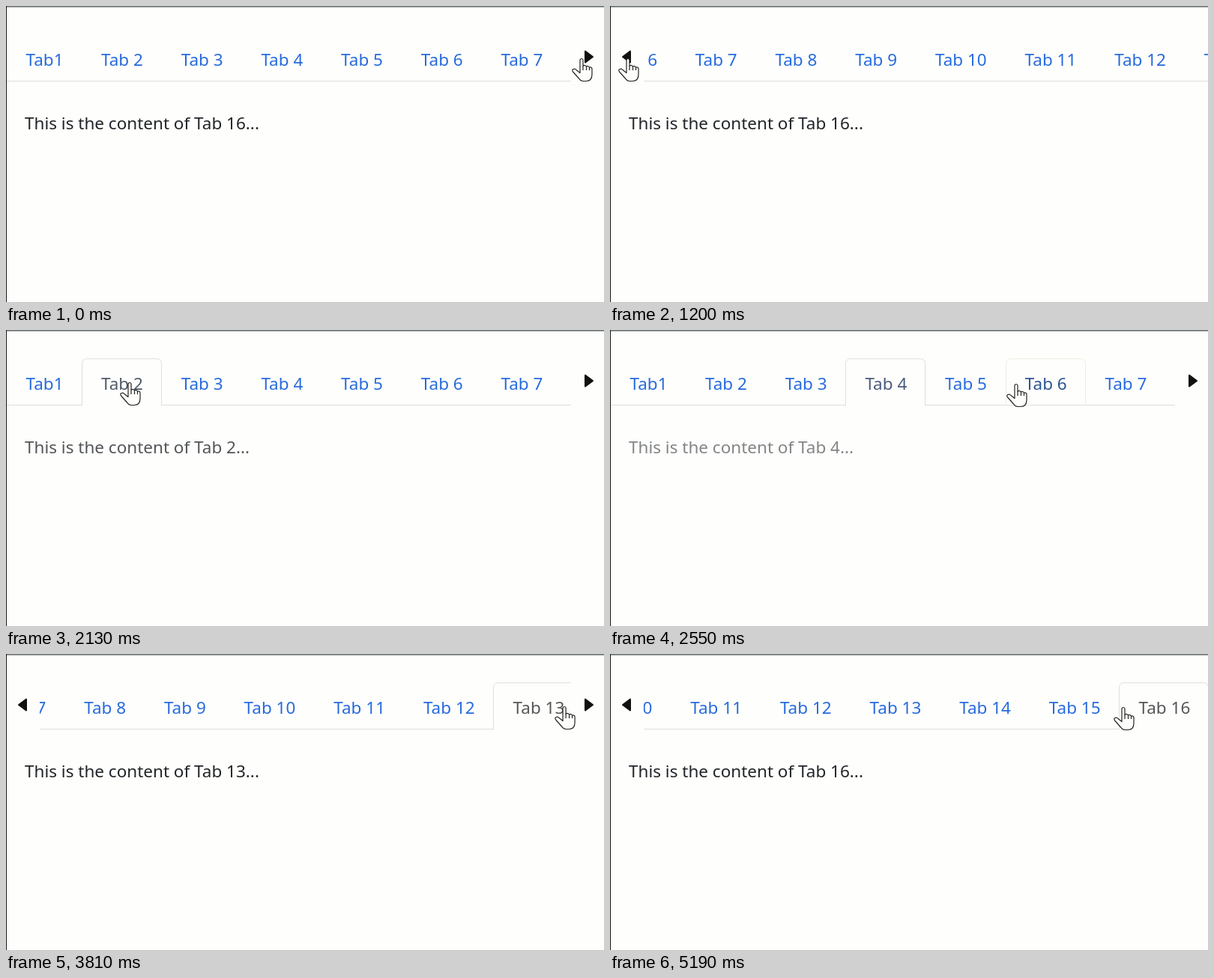
Recreate the animation shown at these times as an HTML page with a canvas. Size 798x396 px, loop 5.22 s.

```html
<!DOCTYPE html>
<html lang="en">
<head>
<meta charset="utf-8">
<title>Scrolling tabs</title>
<style>
html, body { margin: 0; width: 100%; height: 100%; overflow: hidden; background: #fefefc; }
canvas { display: block; }
</style>
</head>
<body>
<canvas id="stage" width="798" height="396"></canvas>
<script>
const ctx = document.getElementById('stage').getContext('2d');
const LOOP = 5220, STEP = 30;
const BG = '#fefefc', INK = '#212529', LINE = '#dee0dc', HOVER_LINE = '#eeefe0', HOVER = '#2a5590';
const LINK = [38, 106, 222], ACTIVE = [84, 87, 86];
const END = 1038, PAGE = 708, SCROLL_SPEED = 1.594;
const FADE_OUT = 60, FADE_IN = 90, DWELL = 60;

// Where the pointer presses: a tab is selected or the strip scrolls.
const events = [
  { t: 0, x: 768, tab: 16 },
  { t: 30, x: 768, scroll: END },
  { t: 920, x: 24, scroll: 0 },
  { t: 1680, x: 81, tab: 1 },
  { t: 2000, x: 165, tab: 2 },
  { t: 2440, x: 370, tab: 4 },
  { t: 2570, x: 542, y: 72, tab: 6 },
  { t: 2700, x: 768, scroll: PAGE },
  { t: 3150, x: 350, tab: 10 },
  { t: 3300, x: 433, tab: 11 },
  { t: 3640, x: 710, tab: 13 },
  { t: 3900, x: 768, scroll: END },
  { t: 4240, x: 685, y: 66, tab: 16 },
  { t: 4590, x: 685, y: 71 },
];
const presses = events.filter(e => 'scroll' in e);
const clicks = events.filter(e => e.tab);

const hand = new Path2D('M-2 2.5a2 2 0 0 1 4 0V10q2.5-1.5 4.5 .8q2.5-1 4 1.2q3.5-.8 3.5 2.5v7' +
  'q0 9-8 9h-4q-3 0-5-3l-8-9q-2.5-3 0-4t4 1l5 4z');
const knuckles = new Path2D('M2 10v6M6.5 11v5M10.5 12v4');

const tabs = Array.from({ length: 16 }, (_, i) => {
  const n = i + 1;
  const x = n === 1 ? 26.5 : n < 11 ? 127 + 106.7 * (n - 2) : 980.6 + 119.65 * (n - 10);
  return { n, x, label: n === 1 ? 'Tab1' : 'Tab ' + n, width: n === 1 ? 100 : n < 10 ? 106 : 119 };
});

const clamp = v => Math.max(0, Math.min(1, v));
const smooth = k => k * k * (3 - 2 * k);
const lerp = (a, b, k) => a + (b - a) * k;
const mix = (a, b, k) => `rgb(${a.map((v, i) => Math.round(lerp(v, b[i], k)))})`;

// Rest until it is time to leave, then glide to the next press and wait there briefly.
function pointerAt(t) {
  const i = Math.max(0, events.findLastIndex(e => e.t <= t));
  const a = events[i], b = events[i + 1] || a;
  const arrive = b.t - DWELL;
  const leave = Math.max(a.t, arrive - 60 - 0.17 * Math.abs(b.x - a.x));
  const k = b === a ? 0 : smooth(clamp((t - leave) / Math.max(1, arrive - leave)));
  return { x: lerp(a.x, b.x, k), y: lerp(a.y ?? 70, b.y ?? 70, k) };
}

// The arrows follow the last position at which the strip came to rest.
function scrollAt(t) {
  let pos = 0, settled = 0;
  for (const p of presses) {
    if (p.t > t) break;
    const k = clamp((t - p.t) * SCROLL_SPEED / Math.abs(p.scroll - settled));
    pos = lerp(settled, p.scroll, k);
    if (k === 1) settled = pos;
  }
  return { pos, settled };
}

function tabFrame(x, width, color, active) {
  const l = Math.floor(x - 25.6) + 0.5, r = l + width;
  if (active) {
    ctx.fillStyle = BG;
    ctx.fillRect(l, 39, width, 63);
  }
  ctx.beginPath();
  ctx.moveTo(l, 101);
  ctx.arcTo(l, 38.5, r, 38.5, 6);
  ctx.arcTo(r, 38.5, r, 101, 6);
  ctx.lineTo(r, 101);
  ctx.strokeStyle = color;
  ctx.stroke();
}

function arrow(x, dir) {
  ctx.beginPath();
  ctx.moveTo(x, 60.5);
  ctx.lineTo(x + 10 * dir, 68);
  ctx.lineTo(x, 75.5);
  ctx.closePath();
  ctx.fillStyle = ctx.strokeStyle = '#111';
  ctx.lineWidth = 2;
  ctx.lineJoin = 'round';
  ctx.fill();
  ctx.stroke();
}

function drawStrip(left, right, shift, pointerX, current, age) {
  ctx.save();
  ctx.beginPath();
  ctx.rect(left, 30, right - left, 80);
  ctx.clip();
  ctx.lineWidth = 1;
  ctx.fillStyle = LINE;
  ctx.fillRect(left, 100, right - left, 1);
  for (const tab of tabs) {
    const x = tab.x + shift, offset = pointerX - x + 25;
    const active = tab.n === current;
    const hover = pointerX >= left && pointerX < right && offset >= 0 && offset < tab.width;
    if (active || hover) tabFrame(x, tab.width, active ? LINE : HOVER_LINE, active);
    ctx.fillStyle = hover && !active ? HOVER : mix(LINK, ACTIVE, active ? clamp(age / 150) : 0);
    ctx.fillText(tab.label, x, 80);
  }
  ctx.restore();
}

function drawContent(c, age) {
  const fading = age < FADE_OUT && c > 0;
  const { tab } = clicks[fading ? c - 1 : c];
  ctx.globalAlpha = fading ? 1 - age / FADE_OUT : c ? clamp((age - FADE_OUT) / FADE_IN) : 1;
  ctx.fillStyle = INK;
  ctx.fillText(`This is the content of Tab ${tab}...`, 25, 165);
  ctx.globalAlpha = 1;
}

function drawHand({ x, y }) {
  ctx.save();
  ctx.translate(x, y);
  ctx.fillStyle = BG;
  ctx.strokeStyle = '#222';
  ctx.lineWidth = 1.2;
  ctx.fill(hand);
  ctx.stroke(hand);
  ctx.stroke(knuckles);
  ctx.restore();
}

function draw(t) {
  const { pos, settled } = scrollAt(t);
  const leftArrow = settled > 0, rightArrow = settled < END;
  const c = clicks.findLastIndex(e => e.t <= t);
  const age = c ? t - clicks[c].t : LOOP;

  ctx.fillStyle = BG;
  ctx.fillRect(0, 0, 798, 396);
  ctx.fillStyle = '#66716f';
  ctx.fillRect(0, 0, 798, 1.6);
  ctx.fillStyle = '#161616';
  ctx.fillRect(0, 0, 1, 396);
  ctx.font = '22.5px "Noto Sans", "Open Sans", sans-serif';

  drawStrip(leftArrow ? 45 : 1, rightArrow ? 754 : 798, (leftArrow ? 45 : 0) - pos,
    pointerAt(Math.max(0, t - STEP)).x, clicks[c].tab, age);
  drawContent(c, age);
  if (leftArrow) arrow(27, -1);
  if (rightArrow) arrow(773, 1);
  drawHand(pointerAt(t));
}

const start = performance.now();
function tick() {
  const t = (performance.now() - start) % LOOP;
  draw(Math.floor(t / STEP) * STEP);
  requestAnimationFrame(tick);
}
tick();
</script>
</body>
</html>
```
